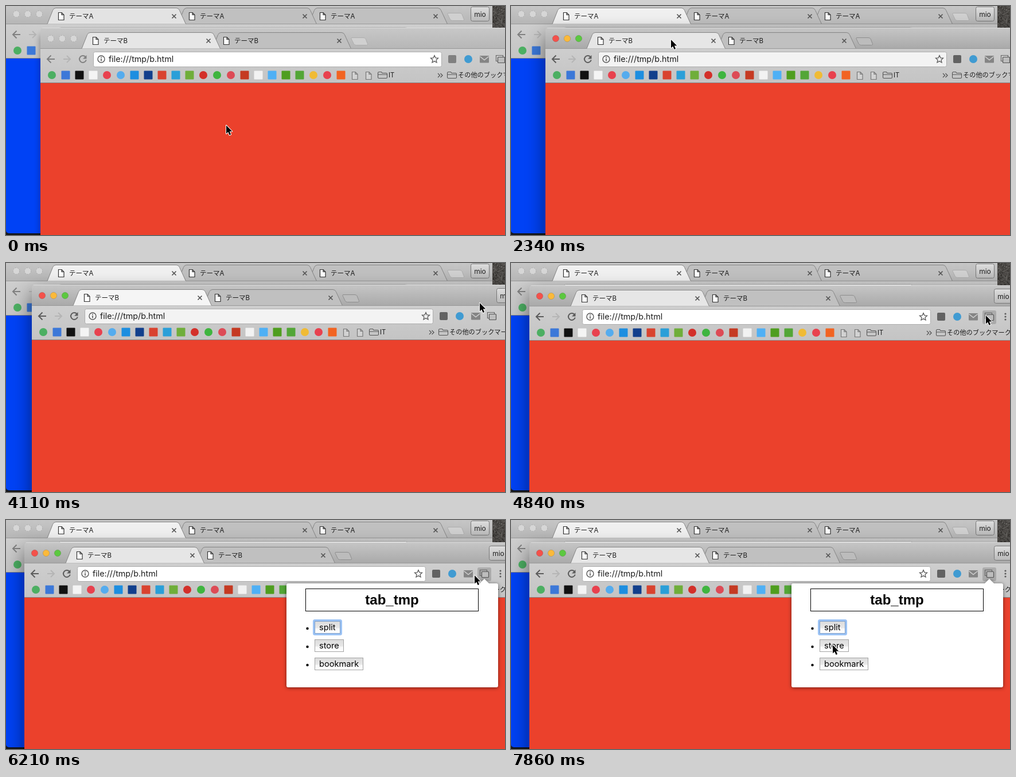
These frames come from a looping animation (870 px wide and 401 px high, 8000 ms). An HTML page:

```html
<!DOCTYPE html>
<html lang="ja">
<head>
<meta charset="utf-8">
<title>Tabs</title>
<style>
html, body { margin: 0; width: 100%; height: 100%; overflow: hidden; background: #15171c; }
svg { display: block; width: 870px; height: 401px; }
text { font-family: Inter, "Noto Sans CJK JP", "Noto Sans CJK", sans-serif; fill: #1c1c1c; white-space: pre; }
.tab { font-size: 11.5px; }
.mark { font-size: 11.2px; }
.url { font-size: 14.3px; }
.user { font-size: 12px; text-anchor: middle; }
.btn { font-size: 14.6px; fill: #000; }
.title { font: bold 24px "Liberation Sans", sans-serif; text-anchor: middle; fill: #000; }
#pane { filter: drop-shadow(0 1px 3px rgba(0, 0, 0, .55)); }
</style>
</head>
<body>
<svg viewBox="0 0 870 401" xmlns="http://www.w3.org/2000/svg">
  <defs>
    <clipPath id="frame"><rect y="-5" width="848" height="403" rx="5"/></clipPath>
    <linearGradient id="barOn" x2="0" y2="1"><stop stop-color="#c6c6c6"/><stop offset="1" stop-color="#a9a9a9"/></linearGradient>
    <linearGradient id="barOff" x2="0" y2="1"><stop stop-color="#c8c8c8"/><stop offset="1" stop-color="#b6b6b6"/></linearGradient>
    <linearGradient id="tools" x2="0" y2="1"><stop stop-color="#cecece"/><stop offset="1" stop-color="#c4c4c4"/></linearGradient>
    <linearGradient id="chip" x2="0" y2="1"><stop stop-color="#dedede"/><stop offset="1" stop-color="#bababa"/></linearGradient>
    <linearGradient id="push" x2="0" y2="1"><stop stop-color="#dcdcdc"/><stop offset=".55" stop-color="#e8e8e8"/><stop offset=".6" stop-color="#f8f8f8"/><stop offset="1" stop-color="#fff"/></linearGradient>
    <filter id="soft" x="-20%" y="-30%" width="140%" height="160%"><feGaussianBlur id="blur" stdDeviation="8"/></filter>
  </defs>
  <rect width="870" height="401" fill="#15171c"/>
  <g id="rock"></g>
  <g id="back"></g>
  <g id="front">
    <rect id="shade" y="8" width="848" height="420" filter="url(#soft)"/>
    <g id="body"></g>
  </g>
  <g id="popup">
    <path id="pane" d="M492 111H826L834 103L842 111H855Q858 111 858 114V290Q858 293 855 293H492Q489 293 489 290V114Q489 111 492 111Z" fill="#fff"/>
    <g id="menu"></g>
  </g>
  <path id="cursor" d="M0 0V14.5L3.3 11.5L5.6 17L8.1 16L5.8 10.6H10.3Z" fill="#000" stroke="#fff" stroke-width="2" stroke-linejoin="round" paint-order="stroke"/>
</svg>
<script>
const LOOP = 8000;
const $ = id => document.getElementById(id);
const rect = (x, y, w, h, fill, more = '') =>
  `<rect x="${x}" y="${y}" width="${w}" height="${h}" fill="${fill}" ${more}/>`;
const dot = (x, y, r, fill, more = '') => `<circle cx="${x}" cy="${y}" r="${r}" fill="${fill}" ${more}/>`;
const line = (d, color, width = 1, fill = 'none') =>
  `<path d="${d}" fill="${fill}" stroke="${color}" stroke-width="${width}"/>`;
const text = (x, y, cls, s) => `<text x="${x}" y="${y}" class="${cls}">${s}</text>`;

const page = (x, y, color, fill) =>
  line(`M${x} ${y}h5.5l4 4v9h-9.5zM${x + 5.5} ${y}v4h4`, color, 1.2, fill);
const folder = x =>
  line(`M${x} 74.5q0-2 2-2h4l1.5 2h6.5q2 0 2 2v5.500q0 1.500-2 1.500h-12q-2 0-2-1.500zM${x} 77h16`, '#555', 1.1);

// Bookmark marks: a leading "o" means round.
const MARKS = ('o#4caf62 #3c78d8 #111 #f4f4f4 o#e8414e o#55acee #1d8ee0 #123f8c #d9432f #2a9fd8 #6fae3a ' +
  'o#d3302a o#3fb53f o#dd4b56 #c53a22 #f2f2f2 #4fb0f5 #4f9e1f #53a637 o#f0bb35 o#e8414e #f26422').split(' ');
const LIGHTS = ['#f4514b', '#fbb93a', '#5cc840'];

function tab(i, label, fill) {
  const shape = 'M72 31.500L81.500 7.500Q83 3.500 87 3.500H297Q301 3.500 302.500 7.500L313.500 31.500';
  return `<g transform="translate(${i * 228})">` + line(shape, '#858585', 1, fill) +
    page(91.5, 11.5, '#333', '#fff') + text(110, 22, 'tab', label) +
    line('M289.500 14.500l7 7m0-7l-7 7', '#555', 1.7) + '</g>';
}

function toolbar(w) {
  const ink = w.on ? '#5c5c5c' : '#808080';
  let s = rect(0, 32, 848, 60, 'url(#tools)');
  s += line('M25 50h-13m6.500-6.500l-6.500 6.500l6.500 6.500', ink, 2);
  s += line('M40 50h12m-6-6l6 6l-6 6', '#b5b5b5', 2);
  s += line('M78.500 46a6 6 0 1 0 1.300 5.500', ink, 2) + `<path d="M80.500 43v6.500h-6.500z" fill="${ink}"/>`;
  s += rect(92.5, 37.5, 607, 26, w.field, 'rx="3" stroke="#adadad"');
  s += dot(106, 50, 6, 'none', 'stroke="#555" stroke-width="1.400"') + line('M106 49v4.500m0-7.500v1.700', '#555', 1.6);
  s += text(119, 55, 'url', w.url);
  s += line('M687 43.500l1.900 4.300l4.600.5l-3.500 3.100l1 4.600l-4-2.400l-4 2.400l1-4.600l-3.500-3.100l4.600-.5z', '#5c5c5c', 1.3);
  if (w.hover) s += rect(w.hover, 39, 24, 24, '#000', 'rx="3" opacity=".16"');
  s += rect(711, 43, 14, 14, w.on ? '#626262' : '#808080', 'rx="2"') + dot(746, 50, 7, '#409bd2');
  s += rect(766, 44, 16, 12.5, '#858585', 'rx="1"') + line('M766.500 45.500l7.500 6l7.500-6', '#d0d0d0', 1.5);
  s += line('M797 53.500h-2.500v-10h12v2.500', '#666', 1.2) + rect(797.5, 46.5, 12, 10, '#bdbdbd', 'rx="1" stroke="#555" stroke-width="1.200"');
  for (const y of [45, 50, 55]) s += dot(830, y, 1.6, '#5c5c5c');
  return s;
}

function bookmarks() {
  let s = MARKS.map((m, i) => {
    const x = 20 + i * 24;
    return m[0] === 'o' ? dot(x, 78, 7, m.slice(1)) : rect(x - 7.5, 70.5, 15, 15, m, 'rx="1"');
  }).join('');
  s += page(543.5, 72.5, '#777', '#d2d2d2') + page(567.5, 72.5, '#777', '#d2d2d2');
  s += folder(588.5) + text(607, 82, 'mark', 'IT');
  s += line('M693 75l3.500 3.500l-3.500 3.500m4.500-7l3.500 3.500l-3.500 3.500', '#555', 1.3);
  return s + folder(709.5) + text(728, 82, 'mark', 'その他のブックマーク');
}

function browser(w) {
  let s = '<g clip-path="url(#frame)">' + rect(0, -5, 848, 37, w.on ? 'url(#barOn)' : 'url(#barOff)');
  s += rect(0, -5, 848, 1, '#dcdcdc');
  LIGHTS.forEach((c, i) => {
    s += dot(18 + i * 20, 14, 5.7, w.on ? c : '#d6d6d6', `stroke="${w.on ? '#0002' : '#aaa'}" stroke-dasharray="${w.on ? 0 : 2}"`);
  });
  for (let i = w.tabs - 1; i >= 0; i--)
    if (i !== w.active) s += tab(i, w.label, w.on && i === 0 ? '#c9c9c9' : '#c0c0c0');
  const n = w.tabs * 228 + 84;
  s += line(`M${n + 3} 12.500h20q3 0 4 2l3.500 9q.5 2-2 2h-18q-3 0-4-2l-4.500-9q-.5-2 1-2z`, w.on ? '#8e8e8e' : '#adadad', 1, w.on ? '#bcbcbc' : '#d0d0d0');
  s += toolbar(w) + rect(0, 31, 848, 1, '#989898');
  s += tab(w.active, w.label, w.bright);
  s += rect(810.5, 1.5, 32, 25, 'url(#chip)', 'rx="3" stroke="#777"') + text(826.5, 19, 'user', 'mio');
  s += bookmarks() + rect(0, 91, 848, 1, '#858585') + rect(0, 92, 848, 310, w.color);
  return s + '</g>';
}

function rock() {
  let seed = 7, s = rect(848, 0, 22, 60, '#4a4744');
  const rnd = () => (seed = seed * 16807 % 2147483647) / 2147483647;
  for (let i = 0; i < 320; i++) {
    const v = 35 + rnd() * 85 | 0;
    s += rect(848 + rnd() * 22, rnd() * 40, 1.5, 1.2, `rgb(${v},${v - 2},${v - 5})`);
  }
  return s;
}

function menu(focus) {
  let s = rect(522.5, 120.5, 301, 39, '#fff', 'stroke="#000"') + text(673, 148, 'title', 'tab_tmp');
  [['split', 45], ['store', 51], ['bookmark', 85]].forEach(([label, w], i) => {
    const y = 177 + i * 32;
    s += dot(525.5, y + 13, 2.2, '#000');
    if (focus && i === 0) s += rect(536.5, y - 1.5, w + 3, 25, '#fff', 'rx="2" stroke="#9cc3f5" stroke-width="3"');
    s += rect(538.5, y + .5, w - 1, 21, 'url(#push)', `stroke="${i ? '#a3a3a3' : '#7e9fc9'}"`) + text(546, y + 16, 'btn', label);
  });
  return s;
}

// Stepped progress: n moves from start to end, the last one lands on the goal.
function steps(t, start, end, n) {
  if (t < start) return 0;
  if (t >= end) return 1;
  return (Math.floor((t - start) / (end - start) * (n - 1)) + 1) / n;
}
const settle = p => 1 - (1 - p) ** 1.35;
const push = p => p ** 1.8;
const smooth = p => p * p * (3 - 2 * p);

// start, end, moves, x, y, easing
const PATH = [
  [60, 540, 8, 437, 57, smooth],
  [790, 1030, 5, 253, 56, smooth],
  [2280, 2690, 7, 727, 109, smooth],
  [2860, 3270, 8, 848, 94, settle],
  [3330, 3430, 3, 851, 52, smooth],
  [3480, 3550, 2, 840, 69, smooth],
  [3910, 4360, 7, 814, 70, settle],
  [4570, 4840, 5, 828, 92, smooth],
  [6210, 6440, 5, 625, 188, push],
  [6620, 6900, 6, 560, 226, settle],
  [6960, 7150, 4, 534, 214, smooth],
  [7210, 7410, 4, 566, 222, smooth],
  [7470, 7600, 3, 575, 228, smooth],
  [7660, 7730, 2, 553, 210, smooth],
  [7780, 7860, 2, 561, 219, smooth]
];

function pointer(t) {
  let x = 384, y = 209;
  for (const [start, end, n, gx, gy, ease] of PATH) {
    const p = ease(steps(t, start, end, n));
    x += (gx - x) * p;
    y += (gy - y) * p;
  }
  return [Math.round(x), Math.round(y)];
}

let last = '';
function paint(on, active, field, hover, drag, focus) {
  $('back').innerHTML = browser({
    tabs: 3, active: 0, label: 'テーマA', url: 'file:///tmp/a.html', color: '#0042f5',
    on: false, field: '#fff', bright: on ? '#f0f0f0' : '#e3e3e3'
  });
  $('body').innerHTML = browser({
    tabs: 2, active, label: 'テーマB', url: 'file:///tmp/b.html', color: '#eb412c',
    on, field, hover, bright: drag ? '#f5f5f5' : '#e6e6e6'
  });
  $('menu').innerHTML = menu(focus);
  $('blur').setAttribute('stdDeviation', on ? 17 : 6);
  $('shade').setAttribute('opacity', on ? .5 : .35);
}

function draw(now) {
  const t = now % LOOP;
  const on = t >= 720;
  const drag = t >= 3910 && t < 4360;
  const state = [
    on,
    on && t < 1810 ? 1 : 0,
    on && t < 2860 || drag ? '#f3f3f3' : '#fff',
    t >= 4770 ? 790 : t >= 3200 && t < 3330 ? 762 : 0,
    drag,
    t >= 5670
  ];
  if (state.join() !== last) {
    last = state.join();
    paint(...state);
  }
  const p = settle(steps(t, 3910, 4360, 7));
  $('front').setAttribute('transform', `translate(${60 - Math.round(28 * p)} ${p > .7 ? 44 : 43})`);
  $('popup').style.display = t >= 5610 ? '' : 'none';
  $('menu').style.display = t >= 5670 ? '' : 'none';
  $('cursor').setAttribute('transform', `translate(${pointer(t).join(' ')})`);
}

$('rock').innerHTML = rock();
const begin = performance.now();
(function tick() {
  draw(performance.now() - begin);
  requestAnimationFrame(tick);
})();
</script>
</body>
</html>
```
